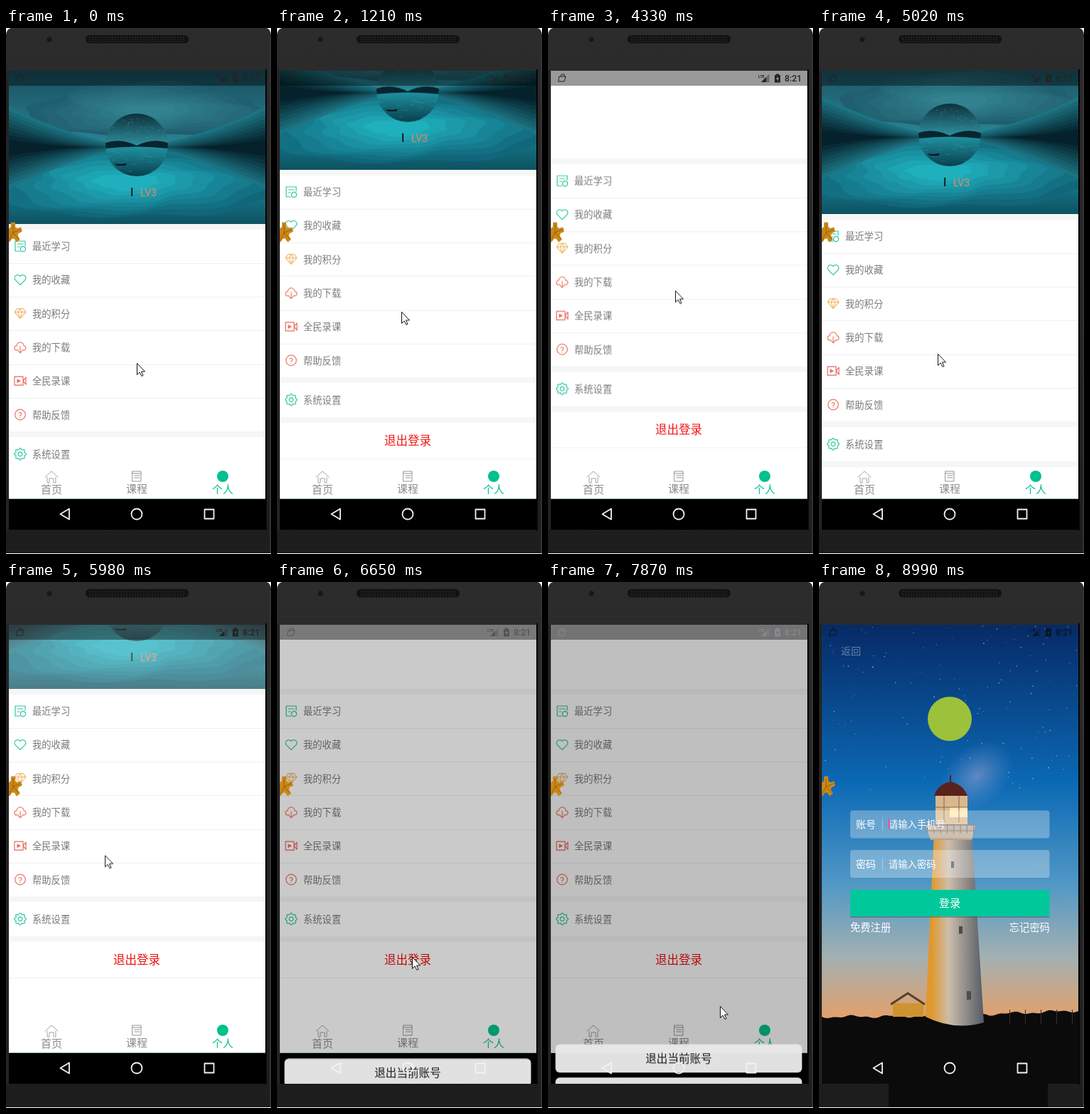
Write an HTML page that moves like this. It is 373 px wide and 738 px high and loops after 9.14 s.

```html
<!DOCTYPE html>
<html lang="zh-CN">
<head>
<meta charset="utf-8">
<title>个人中心</title>
<style>
html, body { margin: 0; width: 100%; height: 100%; overflow: hidden; background: #fff; }
svg { display: block; width: 373px; height: 738px; }
text { font-family: "Noto Sans CJK SC", "Noto Sans CJK", sans-serif; }
.latin { font-family: Roboto, sans-serif; }
.line { fill: none; stroke-linecap: round; stroke-linejoin: round; }

#scroller, #photo, #dim, #sheet, #login, #mouse, #status, #shade { animation: 9.14s linear infinite; }
#scroller { animation-name: scroll; }
#photo { animation-name: photo; }
#dim { animation-name: dim; }
#sheet { animation-name: sheet; }
#login { animation-name: login; }
#mouse { animation-name: mouse; }
#status { animation-name: status; }
#shade { animation-name: shade; }

@keyframes scroll {
  0%, 3.17% { transform: translateY(0); }
  23.41% { transform: translateY(-153px); }
  26.04%, 41.36% { transform: translateY(-189px); }
  53.06%, 53.61% { transform: translateY(0); }
  65.43%, 100% { transform: translateY(-125px); }
}
@keyframes photo {
  0%, 17%, 52.5%, 64.33% { opacity: 1; }
  20%, 48.1%, 68.7%, 100% { opacity: 0; }
}
@keyframes dim {
  0%, 71.3%, 87.5%, 100% { opacity: 0; }
  75.5%, 84.2% { opacity: .6; }
}
@keyframes sheet {
  0%, 71.3%, 87.5%, 100% { transform: translateY(140px); }
  76.6%, 84.2% { transform: translateY(0); }
}
@keyframes login {
  0%, 87.5% { opacity: 0; }
  90.7%, 100% { opacity: 1; }
}
@keyframes mouse {
  0% { transform: translate(184px, 470px); }
  13.24% { transform: translate(175px, 398px); }
  23.41% { transform: translate(175px, 320px); }
  26.04%, 33% { transform: translate(175px, 304px); }
  38.1%, 41.36% { transform: translate(180px, 288px); }
  47.37% { transform: translate(179px, 368px); }
  53.06% { transform: translate(172px, 470px); }
  65.43% { transform: translate(139px, 383px); }
  69.7%, 72.8% { transform: translate(190px, 526px); }
  79.6%, 92.3% { transform: translate(242px, 595px); }
  98.3%, 100% { transform: translate(310px, 760px); }
}
@keyframes status {
  0%, 72% { color: #242424; }
  75.5%, 84.2% { color: #fff; }
  88%, 100% { color: #0a1424; }
}
@keyframes shade {
  0%, 95.3% { opacity: 0; }
  95.4%, 100% { opacity: 1; }
}
</style>
</head>
<body>
<svg id="stage" viewBox="0 0 373 738"></svg>
<script>
const GREEN = '#00c08f';
let seed = 7;
const random = () => (seed = seed * 16807 % 2147483647) / 2147483647;
const repeat = (n, draw) => Array.from({ length: n }, (_, i) => draw(i)).join('');

const rect = (x, y, w, h, fill, more = '') =>
  `<rect x="${x}" y="${y}" width="${w}" height="${h}" fill="${fill}" ${more}/>`;
const circle = (x, y, r, fill, more = '') => `<circle cx="${x}" cy="${y}" r="${r}" fill="${fill}" ${more}/>`;
const shape = (d, fill, more = '') => `<path d="${d}" fill="${fill}" ${more}/>`;
const line = (d, color, width = 1.2) => `<path class="line" d="${d}" stroke="${color}" stroke-width="${width}"/>`;
const ring = (x, y, r) => `M${x - r} ${y}a${r} ${r} 0 1 0 ${2 * r} 0a${r} ${r} 0 1 0 ${-2 * r} 0`;
// y is the middle of the glyphs
const label = (x, y, size, fill, words, anchor = 'start') =>
  `<text x="${x}" y="${y + size * .38}" font-size="${size}" fill="${fill}" text-anchor="${anchor}">${words}</text>`;
const latin = (x, y, size, fill, words, weight = 400) =>
  `<text class="latin" x="${x}" y="${y}" font-size="${size}" fill="${fill}" font-weight="${weight}">${words}</text>`;
const gradient = (id, stops, vector = 'x2="0" y2="1"') => `<linearGradient id="${id}" ${vector}>` +
  stops.map(([at, color]) => `<stop offset="${at}" stop-color="${color}"/>`).join('') + '</linearGradient>';
const clip = (id, content) => `<clipPath id="${id}">${content}</clipPath>`;
const mix = (from, to, k) => `color-mix(in srgb, ${to} ${Math.round(k * 100)}%, ${from})`;
const tinted = (d, from, to, k) => `<path d="${d}" style="fill:${mix(from, to, k)}"/>`;

function loopPath(cx, cy, rx, ry, radius) {
  const points = Array.from({ length: 90 }, (_, i) => {
    const a = i / 90 * 2 * Math.PI, r = radius(a);
    return (cx + rx * r * Math.cos(a)).toFixed(1) + ' ' + (cy + ry * r * Math.sin(a)).toFixed(1);
  });
  return 'M' + points.join('L') + 'Z';
}

// Nested wavy pools of colour
const pool = (cx, cy, rx, ry, from, to) => repeat(8, i => {
  const size = 1 - i / 9;
  const wave = a => 1 + .08 * Math.sin(3 * a + i / 2) + .05 * Math.sin(8 * a + i);
  return tinted(loopPath(cx, cy, rx * size, ry * size, wave), from, to, i / 7);
});

// Nested dark wedges running along the horizon from one side to the middle
const wedge = (edge, direction) => repeat(9, i => {
  const k = i / 8, h = 58 - 46 * k, length = 175 - 75 * k;
  const bend = edge + direction * length * .5, tip = edge + direction * length;
  return tinted(`M${edge} ${168 - h}Q${bend} ${168 - h * .25} ${tip} 167Q${bend} ${168 + h * .25} ${edge} ${168 + h}Z`,
    '#1d7382', '#05222c', k);
});

const defs = `<defs>
  ${gradient('bezel', [[0, '#2c2c2c'], [1, '#1d1d1d']])}
  ${gradient('water', [[0, '#194f5f'], [.45, '#2a8090'], [.65, '#1c95a6'], [1, '#0d5262']])}
  ${gradient('lake', [[0, '#0c303b'], [.45, '#2b8492'], [.52, '#1f93a2'], [1, '#0a3f4d']])}
  ${gradient('sky', [[0, '#062a66'], [.4, '#0b69b4'], [.65, '#4f97c5'], [.84, '#a3b0b2'], [1, '#e5a069']])}
  ${gradient('tower', [[.1, '#e0982c'], [.4, '#cbbdac'], [1, '#555b65']], 'x2="1" y2="0"')}
  <radialGradient id="glow"><stop offset="0" stop-color="#c9b4d8" stop-opacity=".45"/><stop offset="1" stop-color="#8fa0d8" stop-opacity="0"/></radialGradient>
  ${clip('screen', rect(4, 60, 361, 644, '#000'))}
  ${clip('page', rect(4, 60, 361, 557, '#000'))}
  ${clip('photoBox', rect(4, 60, 361, 215, '#000'))}
  ${clip('avatar', circle(184, 164, 44, '#000'))}
</defs>`;

const device = shape('M0 737V9Q1 2 7 0H367Q372 2 373 9V737Z', 'url(#bezel)') +
  rect(0, 60, 4, 644, '#242424') + rect(365, 58, 2, 647, '#050505') + rect(371.5, 12, 1.5, 725, '#3b3b3b') +
  circle(61, 16, 3.5, '#171717') + rect(112, 10, 145, 11.5, '#121212', 'rx="5.5"') +
  repeat(3, i => `<path d="M117 ${13 + 3 * i}H253" stroke="#333" stroke-dasharray="2 2"/>`);

const photo = '<g clip-path="url(#photoBox)">' + rect(4, 60, 361, 215, 'url(#water)') +
  pool(200, 116, 170, 38, '#205f70', '#33828f') +
  pool(170, 216, 205, 52, '#11667a', '#20afbd') +
  wedge(4, 1) + wedge(365, -1) + '</g>' +
  '<g clip-path="url(#avatar)">' + rect(140, 120, 88, 88, 'url(#lake)') +
  shape('M140 161Q162 154 184 165Q206 154 228 161V169Q184 164 140 169Z', '#08252f') +
  repeat(36, () => circle(140 + 88 * random(), 122 + 34 * random(), .5, '#7fc3cc', 'opacity=".7"')) +
  repeat(22, () => rect(142 + 78 * random(), 172 + 32 * random(), 6, .7, '#43b3c0', 'opacity=".4"')) +
  shape('M153 190Q160 192 170 190L168 193H156Z', '#04161d') + '</g>' +
  rect(176.3, 224, 1.8, 12, '#101010') + latin(189, 236, 14, '#ee8468', 'LV3');

const ROWS = [
  ['最近学习', '#2cc7a0', 'M7 -1V-7H-7V7H0M-4 -3H4M-4 1H-1' + ring(4, 4, 3.6)],
  ['我的收藏', '#2cc7a0', 'M0 7L-7 0A4 4 0 0 1 0 -5A4 4 0 0 1 7 0Z'],
  ['我的积分', '#f0bc74', 'M-4 -7H4L8 -2 0 7-8 -2ZM-8 -2H8M-3 -2L0 7 3 -2 0 -7Z'],
  ['我的下载', '#ee8068', 'M-3 4H-5A3 3 0 0 1-5 -2A5 5 0 0 1 5 -2A3 3 0 0 1 5 4H3M0 -1V8L-3 5M0 8L3 5'],
  ['全民录课', '#e8695f', 'M-8 -6H4V6H-8ZM4 0L8 -5V5ZM-4 -2V2L0 0ZM-3 0H-2'],
  ['帮助反馈', '#ec7563', ring(0, 0, 7.3) + 'M-2 -2A2 2 0 1 1 0 1V2M0 4V4.2'],
  ['系统设置', '#2cc7a0', loopPath(0, 0, 7.4, 7.4, a => 1 + .13 * Math.cos(8 * a)) + ring(0, 0, 2.9)]
];
const PITCH = 47.3, GAP = 8;
const rowY = i => 306 + i * PITCH + (i === 6 ? GAP : 0);
const gap = y => rect(4, y, 361, GAP, '#f6f6f6');
const list = gap(275) + gap(566) + gap(622) + rect(4, 680, 361, 1, '#f0f0f0') +
  repeat(5, i => rect(4, Math.round(rowY(i) + PITCH / 2), 361, 1, '#efefef')) +
  ROWS.map(([words, color, icon], i) =>
    `<g transform="translate(20 ${rowY(i)})">${line(icon, color)}</g>` + label(37, rowY(i), 13.3, '#7a7a7a', words)).join('') +
  label(184, 655, 16.5, '#f01010', '退出登录', 'middle');

const tabs = rect(4, 617, 361, 43, '#fff') +
  line('M55 630L64 622 73 630M58 630V638H61V632H67V638H70V630', '#999', .9) +
  line('M178 622H190V636H178ZM178 625H190M181 628H188M181 631H188', '#8b8b8b', .9) +
  circle(305, 629, 8, GREEN) +
  label(64, 647, 15, '#8b8b8b', '首页', 'middle') + label(184, 646, 15, '#8b8b8b', '课程', 'middle') +
  label(305, 647, 15, GREEN, '个人', 'middle');

const button = (y, color, words) => rect(10.5, y, 347, 39.5, '#e9e9e9', 'rx="6" opacity=".97"') +
  label(184, y + 19.7, 15.6, color, words, 'middle');
const sheet = button(567.5, '#1b1b1b', '退出当前账号') + button(614, '#1bc096', '取消');

const field = (y, name, hint) => rect(44, y, 280.5, 39, '#fff', 'rx="4" opacity=".3"') +
  label(52, y + 19.5, 14, '#fff', name) + rect(89, y + 11, 1, 17, '#fff', 'opacity=".35"') +
  label(98, y + 19.5, 13.3, '#fff', hint);

const groundY = x => 610 - 9 * (x / 365) ** 2 + 1.5 * Math.sin(x / 9) + Math.sin(x / 3.7);
const ground = 'M4 704' + repeat(92, i => `L${4 + 4 * i} ${groundY(4 * i).toFixed(1)}`) + 'V704Z';

const lighthouse =
  '<ellipse cx="222" cy="272" rx="58" ry="42" fill="url(#glow)" transform="rotate(-40 222 272)"/>' +
  shape('M104 591H147V610H104Z', '#cf9330') + line('M102 592L125 577 148 592', '#54402e', 3) +
  shape('M162 350H215L232 618Q190 630 150 610Z', 'url(#tower)') +
  rect(164, 300, 45, 40, '#d9b88d') + rect(184, 316, 25, 14, '#ffe8b4') +
  line('M164 316H209M176 301V337M197 301V337', '#8b6250', 1) +
  shape('M162 300Q167 284 185 280Q203 284 209 300Z', '#5b211d') + line('M185 282V272', '#47262a', 2) +
  shape('M150 341H220L215 362H157Z', '#b9a48f') + line('M150 341H220M151 349H219', '#685b55', 1) +
  repeat(8, i => rect(152 + 9.3 * i, 341, 1, 12, '#685b55')) +
  repeat(3, i => rect(186 + 11 * i, 392 + 91 * i, 4 + i, 9 + 1.5 * i, '#484c53'));

const login = rect(4, 60, 361, 555, 'url(#sky)') +
  repeat(150, () => circle(4 + 361 * random(), 60 + 240 * random() ** 1.2, .35 + .45 * random(), '#d6e6f4', `opacity="${.3 + .6 * random()}"`)) +
  shape(ground, '#0b0b0b') + lighthouse +
  repeat(5, i => rect(268 + 22 * i, 600, 1, 20, '#3b2d27')) +
  circle(184, 192, 31, '#9cc23b') +
  line('M22 93L18 97 22 101', '#23436d', 1.3) + label(31, 97, 14, '#6580a8', '返回') +
  field(320.5, '账号', '请输入手机号') + field(376, '密码', '请输入密码') +
  line('M306 398Q312 391 318 398Q312 404 306 398', '#a2b0b8', 1) + rect(98, 332, 1.6, 15, '#ff4081') +
  rect(44, 469, 280.5, 2, '#31505b', 'opacity=".4"') + rect(44, 432, 280.5, 37, '#00c89b') +
  label(184, 450, 15.3, '#fff', '登录', 'middle') +
  label(44, 485, 14.3, '#fff', '免费注册') + label(325, 485, 14.3, '#fff', '忘记密码', 'end');

const status = '<g id="status">' +
  line('M16 68H25L23 75H15ZM18 68L19 65H23V68', 'currentColor', 1) +
  latin(296, 70, 5.5, 'currentColor', 'LTE', 700) +
  shape('M300 76L311.5 64.5V76Z', 'currentColor', 'opacity=".4"') + shape('M300 76L307 69V76Z', 'currentColor') +
  shape('M319 66H321V64.5H325V66H327V76.5H319ZM324 67L321 72H323V75L325 70H323Z', 'currentColor', 'fill-rule="evenodd"') +
  latin(333, 75, 12.4, 'currentColor', '8:21', 500) + '</g>';

const navKeys = line('M89 674.5V689.5L76.5 682Z' + ring(184, 682, 7.5) + 'M279.5 675.5h13v13h-13Z', '#f2f2f2', 1.8);

const lobes = a => .5 + .45 * Math.cos(2.5 * (a + Math.PI / 2)) ** 2 + .07 * Math.cos(15 * a + Math.PI / 2);
const leaf = '<g clip-path="url(#screen)">' + shape(loopPath(10, 287, 14, 16, lobes), '#cb8817') +
  line('M5 297L10 287V276M10 287L20 283M10 287L18 296', '#8c560d', .8) + '</g>';

const mouse = `<g id="mouse">${shape('M.5 .5V16.5L4 13 7 18.5 9 17.5 6.5 12H11.5Z', '#fff', 'stroke="#111"')}</g>`;

document.getElementById('stage').innerHTML = defs + device +
  rect(4, 60, 361, 600, '#fff') +
  `<g clip-path="url(#page)"><g id="scroller">${list}<g id="photo">${photo}</g></g></g>` + tabs +
  rect(4, 60, 361, 21, '#000', 'opacity=".4"') + rect(4, 60, 361, 600, '#000', 'id="dim"') +
  rect(4, 660, 361, 44, '#000') + rect(4, 660, 361, 1, '#8fb5a5') +
  `<g clip-path="url(#screen)"><g id="sheet">${sheet}</g><g id="login">${login}</g></g>` +
  rect(98, 704, 224, 33, '#0b0b0b', 'id="shade"') + status + navKeys + leaf + mouse;
</script>
</body>
</html>
```
